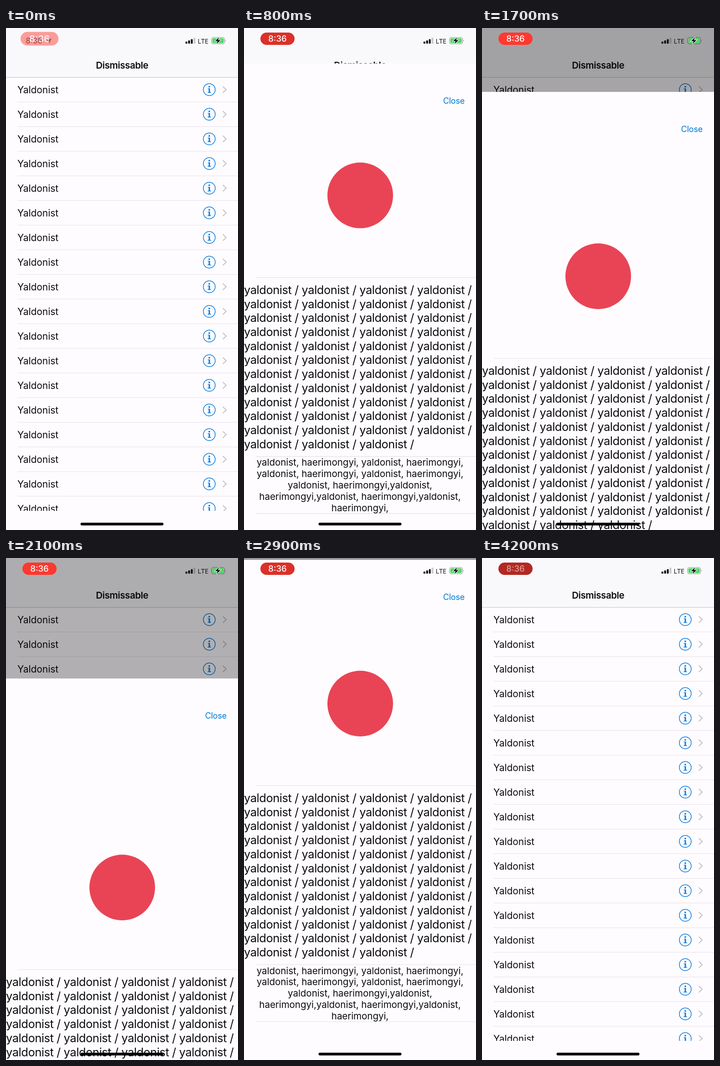
An HTML page for the animation above (4.3 s loop, 509 px wide and 1100 px high).

```html
<!DOCTYPE html>
<html lang="en">
<head>
<meta charset="utf-8">
<title>Dismissable</title>
<style>
  html, body { margin: 0; width: 100%; height: 100%; overflow: hidden; background: #fefcff; }
  svg { display: block; font-family: Inter, Roboto, sans-serif; fill: #0c0c0e; }
  .title { font-size: 20.4px; font-weight: 600; letter-spacing: -.38px; text-anchor: middle; }
  .row { font-size: 20.9px; }
  .close { font-size: 18px; letter-spacing: -.2px; text-anchor: end; fill: #007ad6; }
  .body { font-size: 25.4px; letter-spacing: -.42px; }
  .small { font-size: 20.6px; letter-spacing: -.08px; text-anchor: middle; }
  .time { font-size: 18.5px; font-weight: 500; text-anchor: middle; }
  .lte { font-family: "Open Sans", Roboto, sans-serif; font-size: 14.6px; }
  .rule { stroke: #e3e1e5; stroke-width: 1.2; }
</style>
</head>
<body>
<svg width="509" height="1100" viewBox="0 0 509 1100">
  <defs>
    <clipPath id="listClip"><rect y="108" width="509" height="950"/></clipPath>
    <g id="accessory" fill="none">
      <circle cx="446" r="13" stroke="#0b7cdc" stroke-width="1.5"/>
      <circle cx="446" cy="-6.4" r="1.9" fill="#0b7cdc"/>
      <path d="M442.6-2.8H447.6V5.6H449.8V7H442.4V5.6H444.6V-1.4H442.6Z" fill="#0b7cdc"/>
      <path d="M475.8-7L483-0L475.8 7" stroke="#c5c4c9" stroke-width="2.2"/>
    </g>
  </defs>
  <rect width="509" height="1100" fill="#fefcff"/>
  <g id="list" clip-path="url(#listClip)"></g>
  <rect width="509" height="108" fill="#f9f8fb"/>
  <path d="M0 108.3H509" stroke="#bfbdc2"/>
  <text class="title" x="254.7" y="88.5">Dismissable</text>
  <rect id="dim" width="509" height="1100" fill="#000"/>
  <g id="sheet">
    <rect width="509" height="1100" fill="#fefcff"/>
    <g id="content"><circle cx="255" cy="289" r="72" fill="#e94455"/></g>
    <text class="close" x="484" y="88">Close</text>
  </g>
  <g id="clock">
    <text class="time" x="61.5" y="34" style="font-size:16.8px">8:36</text>
    <path d="M88.5 27.5L100 22.5L95 34L94 28.5Z"/>
  </g>
  <g id="pill">
    <rect id="pillBox" x="36" y="10" width="75" height="27" rx="13.5"/>
    <text id="pillTime" class="time" x="73.5" y="30.2" fill="#fff">8:36</text>
  </g>
  <g id="signal"></g>
  <text class="lte" x="420.6" y="33.8">LTE</text>
  <rect x="451" y="20.7" width="28.5" height="14" rx="4" fill="none" stroke="#000" stroke-opacity=".42" stroke-width="1.1"/>
  <path d="M481 25.4Q483 27.7 481 30Z" fill-opacity=".42"/>
  <rect x="452.8" y="22.5" width="24.9" height="10.4" rx="2.3" fill="#4cd964"/>
  <path d="M467.3 20.6L458.8 28.8H464L461.8 35L470.8 26.4H465.4Z" stroke="#fff" stroke-width="2" paint-order="stroke"/>
  <rect x="163.5" y="1084" width="182" height="6" rx="3" fill="#000"/>
</svg>
<script>
const LOOP = 4300, STEP = 100, H = 1100;
const NAME = 'yaldonist', HANDLE = 'haerimongyi';
const $ = id => document.getElementById(id);

function add(parent, tag, attrs, text) {
  const el = document.createElementNS('http://www.w3.org/2000/svg', tag);
  for (const k in attrs) el.setAttribute(k, attrs[k]);
  if (text) el.textContent = text;
  parent.appendChild(el);
}
const rule = (parent, y) => add(parent, 'path', { class: 'rule', d: `M25 ${y}H509` });

function buildList() {
  const label = NAME[0].toUpperCase() + NAME.slice(1);
  for (let i = 0; i < 18; i++) {
    const mid = 135 + 54 * i;
    add($('list'), 'text', { class: 'row', x: 25, y: mid + 7.6 }, label);
    add($('list'), 'use', { href: '#accessory', y: mid });
    rule($('list'), mid + 27);
  }
}

function buildSheet() {
  const content = $('content');
  [469, 861, 986].forEach(y => rule(content, y));
  for (let i = 0; i < 12; i++) {
    const line = Array(i < 11 ? 4 : 3).fill(NAME + ' /').join(' ');
    add(content, 'text', { class: 'body', x: 0, y: 505 + 30.73 * i }, line);
  }
  const pair = `${NAME}, ${HANDLE},`, swap = `${HANDLE},${NAME},`;
  [`${pair} ${pair}`, `${pair} ${pair}`, `${pair}${NAME},`, `${swap} ${swap}`, `${HANDLE},`]
    .forEach((line, i) => add(content, 'text', { class: 'small', x: 254.5, y: 881.5 + 24.9 * i }, line));
}

function buildSignal() {
  [4.5, 7, 9.8, 13].forEach((h, i) => add($('signal'), 'rect', {
    x: 393.8 + 5.9 * i, y: 34.3 - h, width: 4, height: h, rx: 1, 'fill-opacity': i < 3 ? 1 : .2
  }));
}

// Drag down, let go, then drag again and dismiss: [ms, px]
const sheetKeys = [[1300, 0], [1400, 6], [1500, 40], [1700, 140], [1900, 220], [2100, 264], [2250, 270],
  [2400, 120], [2500, 40], [2600, 10], [2700, 0], [2800, 0], [2900, 4], [3000, 60], [3100, 240],
  [3200, 620], [3300, 937], [3400, 1060], [3500, H]];
const pullKeys = [[1300, 0], [1400, 28], [1500, 60], [1700, 115], [1900, 150], [2100, 169], [2250, 171],
  [2400, 70], [2500, 22], [2600, 5], [2700, 0], [2800, 0], [2900, 26], [3000, 70], [3100, 130],
  [3200, 100], [3300, 30], [3400, 0]];

function track(keys, t) {
  if (t <= keys[0][0]) return keys[0][1];
  for (let i = 1; i < keys.length; i++) {
    const [t0, a] = keys[i - 1], [t1, b] = keys[i];
    if (t <= t1) return a + (b - a) * (t - t0) / (t1 - t0);
  }
  return keys[keys.length - 1][1];
}

function present(t) {
  const s = 18 * Math.max(0, t - 560) / 1000;
  return t >= 1200 ? 0 : H * (1 + s) * Math.exp(-s);
}

function drawPill(t) {
  const shown = Math.min(1, t / 300);
  const grow = 1 + .11 * (1 - shown) ** 2;
  const press = Math.max(0, Math.min(1, (t - 4000) / 200));
  const pulse = Math.cos((t - 1850) / 1000 * Math.PI);
  const level = Math.min(1, (238 + 20 * pulse) / 255) * (1 - press) + .7 * press;
  const rgb = [255, 57, 48].map(c => Math.round(c * level));
  $('pillBox').setAttribute('fill', `rgb(${rgb})`);
  $('pillTime').setAttribute('fill-opacity', 1 - .45 * press);
  $('pill').setAttribute('opacity', .48 + .52 * shown);
  $('pill').setAttribute('transform', `translate(73.5 23.5) scale(${grow}) translate(-73.5 -23.5)`);
  $('clock').setAttribute('opacity', .65 * (1 - shown));
}

function draw(t) {
  const dragging = t >= 1300;
  const y = dragging ? track(sheetKeys, t) : present(t);
  $('sheet').setAttribute('transform', `translate(0 ${y.toFixed(1)})`);
  $('content').setAttribute('transform', `translate(0 ${track(pullKeys, t).toFixed(1)})`);
  $('dim').setAttribute('opacity', dragging ? .4 * (1 - y / H) : 0);
  drawPill(t);
}

buildList();
buildSheet();
buildSignal();

const start = performance.now();
function tick() {
  const t = (performance.now() - start + 20) % LOOP;
  draw(Math.floor(t / STEP) * STEP);
  requestAnimationFrame(tick);
}
tick();
</script>
</body>
</html>
```
